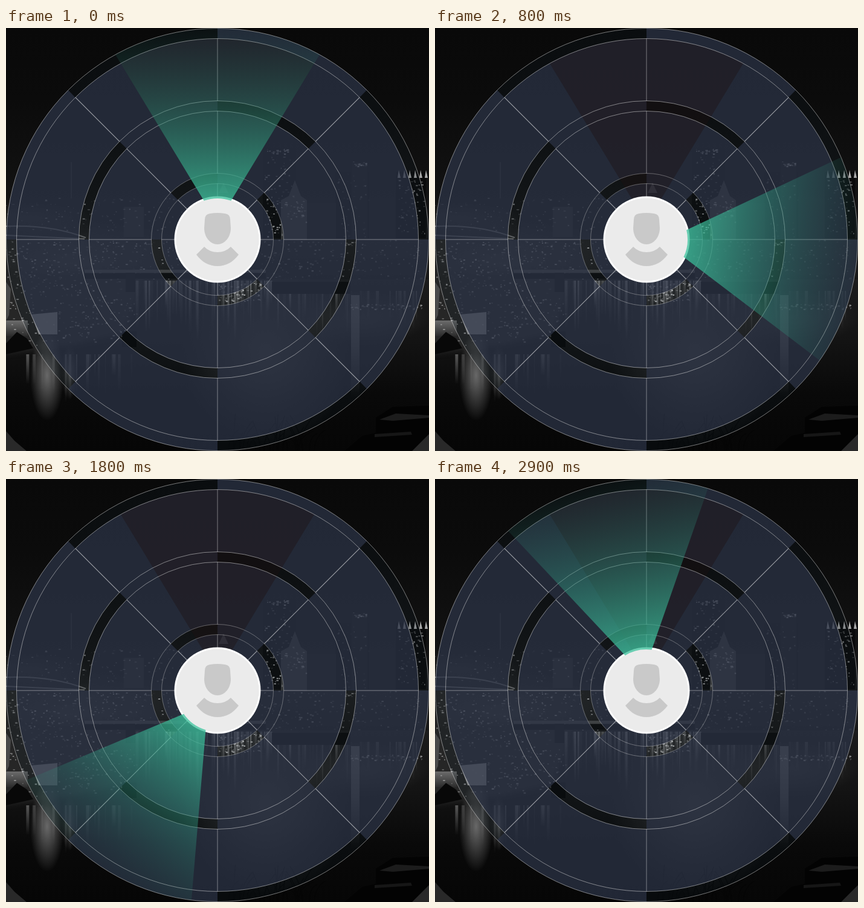
Recreate the animation shown at these times as an HTML page with a canvas. Size 700x700 px, loop 3 s.

```html
<!DOCTYPE html>
<html lang="en">
<head>
<meta charset="utf-8">
<title>Radar sweep</title>
<style>
  html, body { margin: 0; width: 100%; height: 100%; overflow: hidden; background: #0a0a0a; }
  canvas { display: block; width: 700px; height: 700px; }
</style>
</head>
<body>
<canvas id="stage" width="700" height="700"></canvas>
<script>
const SIZE = 700, C = SIZE / 2, TAU = Math.PI * 2;
const RINGS = [349.5, 332.5, 229.5, 212.5, 109.5, 92.5];
const LOOP = 3000, STEP = 100;

const stage = document.getElementById('stage').getContext('2d');
const backdrop = document.createElement('canvas');
backdrop.width = backdrop.height = SIZE;
const g = backdrop.getContext('2d');

let seed = 11;
const random = () => (seed = (seed * 16807) % 2147483647) / 2147483647;
const gray = (v, a = 1) => `rgba(${v},${v},${v},${a})`;

function box(x, y, w, h, fill) {
  g.fillStyle = fill;
  g.fillRect(x, y, w, h);
}

function shape(fill, ...points) {
  g.fillStyle = fill;
  g.beginPath();
  for (let i = 0; i < points.length; i += 2) g.lineTo(points[i], points[i + 1]);
  g.fill();
}

function fade(y0, y1, ...stops) {
  const grad = g.createLinearGradient(0, y0, 0, y1);
  stops.forEach((c, i) => grad.addColorStop(i / (stops.length - 1), c));
  return grad;
}

function glow(x, y, rx, ry, v, a) {
  g.save();
  g.translate(x, y);
  g.scale(rx, ry);
  const grad = g.createRadialGradient(0, 0, 0, 0, 0, 1);
  grad.addColorStop(0, gray(v, a));
  grad.addColorStop(1, gray(v, 0));
  box(-1, -1, 2, 2, grad);
  g.restore();
}

function lights(count, x, y, w, h, strength) {
  for (let i = 0; i < count; i++) {
    box(x + random() * w, y + random() * h, 1 + random() * 3, 1 + random() * 1.5,
      gray(225, strength * random()));
  }
}

function reflections(count, x, y, w, length, strength) {
  for (let i = 0; i < count; i++) {
    const end = y + length * (0.3 + 0.7 * random());
    box(x + random() * w, y, 1 + random() * 4, end - y,
      fade(y, end, gray(200, strength * random()), gray(200, 0)));
  }
}

function paintSkyline() {
  box(0, 0, SIZE, 350, fade(0, 350, '#090909', '#0b0b0b', '#101010', '#171717'));
  box(0, 350, SIZE, 70, fade(350, 420, '#202020', '#161616'));
  glow(110, 390, 220, 75, 85, 0.45);
  glow(40, 315, 110, 30, 80, 0.3);

  box(195, 296, 33, 50, '#2c2c2c');
  box(107, 222, 2, 60, '#2c2c2c');
  box(425, 198, 55, 150, '#0c0c0c');
  box(545, 238, 56, 110, '#0c0c0c');
  box(572, 222, 26, 126, '#151515');
  box(645, 238, 50, 110, '#0a0a0a');
  box(498, 290, 48, 62, '#1b1b1b');
  shape('#3c3c3c', 455, 350, 455, 285, 468, 278, 478, 252, 488, 278, 498, 285, 498, 350);
  shape('#777', 352, 273, 360, 256, 368, 273);
  lights(30, 432, 200, 35, 8, 0.8);
  lights(25, 574, 221, 23, 7, 0.8);
  for (let x = 648; x < 696; x += 9) shape('#aaa', x, 248, x + 2, 235, x + 5, 248);
  lights(40, 427, 212, 50, 75, 0.6);
  lights(45, 427, 275, 30, 70, 0.9);
  lights(40, 458, 285, 38, 36, 0.8);
  lights(60, 547, 240, 52, 105, 0.4);
  lights(80, 648, 250, 44, 90, 0.6);
  lights(130, 0, 280, 290, 55, 0.5);
  lights(400, 0, 352, 300, 105, 0.8);
  lights(220, 420, 350, 270, 65, 0.5);

  g.strokeStyle = gray(150, 0.7);
  g.lineWidth = 2;
  g.beginPath();
  g.moveTo(0, 328);
  g.quadraticCurveTo(75, 325, 132, 347);
  g.moveTo(0, 343);
  g.lineTo(130, 349);
  g.stroke();
}

function paintShore() {
  g.filter = 'blur(5px)';
  shape('#262626', -20, 405, 230, 405, 215, 450, 195, 505, 110, 525, -20, 540);
  g.filter = 'none';
  lights(230, 0, 405, 215, 90, 0.7);
  shape('#4a4a4a', 0, 420, 8, 432, 5, 475, 0, 485);
  box(0, 484, 36, 26, fade(484, 510, '#6c6c6c', '#2c2c2c'));
  shape('#999', 42, 474, 85, 470, 85, 507, 54, 507);
  lights(70, 0, 475, 210, 50, 0.7);
  shape('#080808', 0, 522, 18, 503, 35, 514, 45, 530, 0, 540);
  box(192, 502, 24, 26, '#080808');
}

function paintRiver() {
  box(0, 416, SIZE, 284, fade(416, 700, '#1c1c1c', '#141414', '#090909', '#060606'));
  glow(430, 540, 140, 150, 95, 0.5);
  glow(590, 480, 110, 45, 75, 0.45);
  paintShore();
  reflections(70, 212, 418, 230, 100, 0.65);
  reflections(40, 440, 435, 240, 80, 0.4);
  box(571, 442, 14, 170, fade(442, 612, gray(150, 0.6), gray(130, 0.5), gray(90, 0)));
  lights(90, 570, 456, 120, 9, 0.6);

  box(130, 400, 300, 5, '#4c4c4c');
  box(130, 406, 300, 9, '#0d0d0d');
  box(198, 405, 16, 32, '#111');
  box(440, 420, 130, 20, '#0c0c0c');
  lights(90, 350, 422, 75, 30, 0.9);

  glow(68, 575, 28, 75, 165, 0.6);
  glow(105, 570, 14, 45, 150, 0.4);
  reflections(20, 30, 540, 180, 80, 0.4);

  shape('#030303', 612, 645, 640, 627, 700, 625, 700, 700, 560, 700, 590, 675, 612, 670);
  shape('#1c1c1c', 618, 648, 645, 638, 700, 641, 700, 645, 640, 650);
  shape('#161616', 610, 672, 670, 668, 672, 673, 610, 677);
  shape('#292929', 0, 667, 14, 683, 34, 700, 0, 700);
  shape('#292929', 700, 672, 686, 686, 672, 700, 700, 700);

  g.strokeStyle = '#050505';
  g.lineWidth = 1.3;
  g.beginPath();
  for (let i = 0; i < 32; i++) {
    const x = 360 + random() * 160, lean = (random() - 0.5) * 50;
    g.moveTo(x, 700);
    g.quadraticCurveTo(x, 675, x + lean, 638 + random() * 45);
  }
  g.stroke();
}

function sector(outer, inner, from, to) {
  g.beginPath();
  g.arc(C, C, outer, from, to);
  g.arc(C, C, inner, to, from, true);
  g.fill();
}

// Fan pointing up, in coordinates centred on the dial.
function fanPath(ctx, radius) {
  const tip = Math.asin(169 / 349.5), base = Math.asin(22.5 / 68), up = -Math.PI / 2;
  ctx.beginPath();
  ctx.arc(0, 0, radius, up - tip, up + tip);
  ctx.arc(0, 0, 68, up + base, up - base, true);
  ctx.closePath();
}

function paintDial() {
  const blue = 'rgba(43,51,69,.76)', dark = 'rgba(14,30,36,.22)';
  g.fillStyle = blue;
  for (let i = 1; i < 6; i += 2) sector(RINGS[i], RINGS[i + 1] || 0, 0, TAU);
  for (let ring = 0; ring < 3; ring++) {
    for (let k = 0; k < 8; k++) {
      g.fillStyle = (k + ring) % 2 ? dark : blue;
      sector(RINGS[ring * 2], RINGS[ring * 2 + 1], k * TAU / 8, (k + 1) * TAU / 8);
    }
  }

  g.save();
  g.translate(C, C);
  g.beginPath();
  g.arc(0, 0, RINGS[1], 0, TAU);
  g.clip();
  fanPath(g, RINGS[0]);
  g.fillStyle = 'rgba(30,18,18,.38)';
  g.fill();
  g.restore();

  g.lineWidth = 1;
  RINGS.forEach((r, i) => {
    g.strokeStyle = gray(255, i < 4 ? 0.45 : 0.32);
    g.beginPath();
    g.arc(C, C, r, 0, TAU);
    g.stroke();
  });
  // Spokes cross the wide bands only.
  for (let k = 0; k < 8; k++) {
    g.save();
    g.translate(C, C);
    g.rotate(k * TAU / 8);
    g.strokeStyle = gray(255, k % 2 ? 0.6 : 0.42);
    g.beginPath();
    for (let i = 1; i < 6; i += 2) {
      g.moveTo(RINGS[i], 0);
      g.lineTo(RINGS[i + 1] || 0, 0);
    }
    g.stroke();
    g.restore();
  }
}

function paintAvatar() {
  const disc = (r, fill) => {
    g.fillStyle = fill;
    g.beginPath();
    g.arc(C, C, r, 0, TAU);
    g.fill();
  };
  disc(71.5, '#fff');
  disc(68.5, '#ebebeb');
  g.fillStyle = '#c9c9c9';
  g.fill(new Path2D('M329 317Q329 308 338 307Q350 305 362 307Q371 308 371 317L372 331C372 346 362 358 350 358C338 358 328 346 328 331Z'));
  g.fill(new Path2D('M315 375L328 362Q337 371 350 371Q363 371 372 362L385 375Q371 394 350 394Q329 394 315 375Z'));
}

paintSkyline();
paintRiver();
paintDial();
paintAvatar();

const beam = stage.createLinearGradient(0, -68, 0, -349.5);
beam.addColorStop(0, 'rgba(60,192,155,.77)');
beam.addColorStop(0.5, 'rgba(48,152,128,.4)');
beam.addColorStop(1, 'rgba(42,112,98,.04)');

function draw(now) {
  const time = Math.floor(now % LOOP / STEP) * STEP;
  stage.drawImage(backdrop, 0, 0);
  stage.save();
  stage.translate(C, C);
  stage.rotate(time / LOOP * TAU);
  fanPath(stage, RINGS[0]);
  stage.fillStyle = beam;
  stage.fill();
  stage.restore();
}

const start = performance.now();
function tick() {
  draw(performance.now() - start);
  requestAnimationFrame(tick);
}
tick();
</script>
</body>
</html>
```
